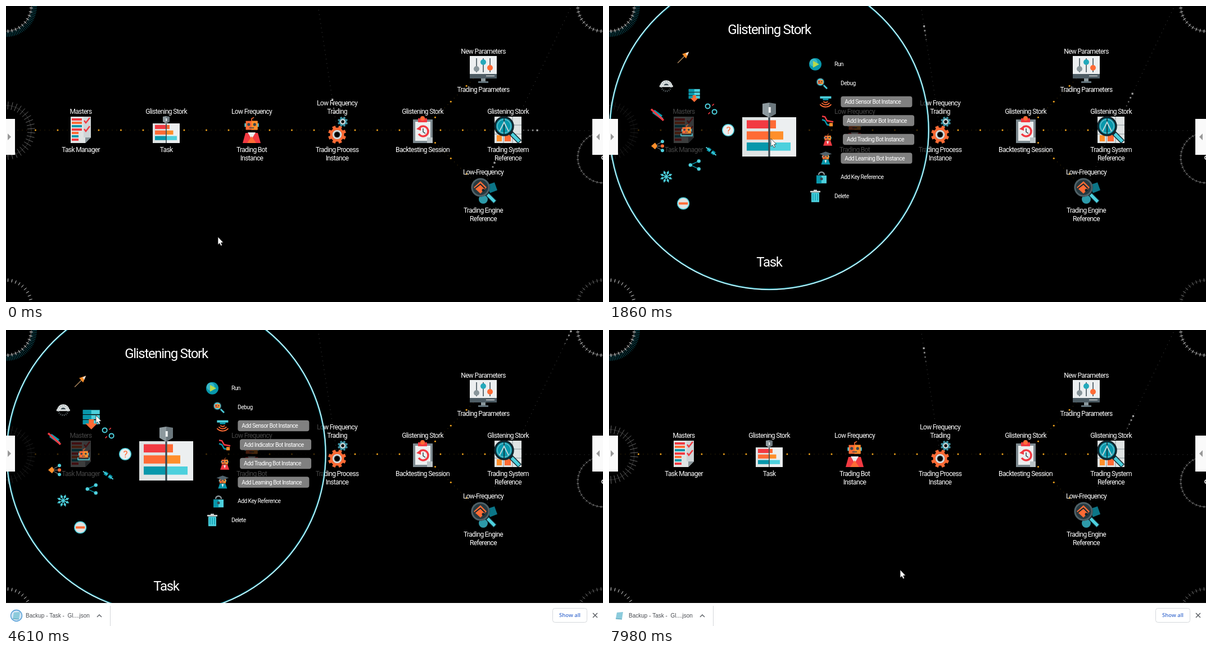
An HTML page with a canvas for the animation above (8 s loop, 1062x527 px).

```html
<!DOCTYPE html>
<html lang="en">
<head>
<meta charset="utf-8">
<title>Task backup</title>
<style>
html, body { margin: 0; width: 100%; height: 100%; overflow: hidden; background: #000 }
canvas { display: block }
</style>
</head>
<body>
<canvas id="stage" width="1062" height="527"></canvas>
<script>
const ctx = document.getElementById('stage').getContext('2d');
const LOOP = 8000, TAU = Math.PI * 2, ROW = 221, GAP = 152, FIRST = 133, OPEN = FIRST + GAP;
const RED = '#f23a42', ORANGE = '#ff6b35', AMBER = '#ff8f2b', TEAL = '#0797ab', CYAN = '#4dd0dd',
  INK = '#10262e', DARK = '#37474f', GREY = '#89969b', PAPER = '#dfe3e3', WHITE = '#eceff0';
const ramp = (t, a, b) => Math.max(0, Math.min(1, (t - a) / (b - a)));
const mix = (a, b, f) => a + (b - a) * f;

// Drawing helpers
function rect(x, y, w, h, c) { ctx.fillStyle = c; ctx.fillRect(x, y, w, h); }
function square(x, y, s, c) { rect(x - s / 2, y - s / 2, s, s, c); }
function disc(x, y, r, c, a = 0, b = TAU) { ctx.fillStyle = c; ctx.beginPath(); ctx.arc(x, y, r, a, b); ctx.fill(); }
function arc(x, y, r, c, w = 1, a = 0, b = TAU) {
  ctx.strokeStyle = c; ctx.lineWidth = w; ctx.beginPath(); ctx.arc(x, y, r, a, b); ctx.stroke();
}
function trace(p) {
  ctx.beginPath();
  for (let i = 0; i < p.length; i += 2) ctx.lineTo(p[i], p[i + 1]);
}
function line(c, w, ...p) { ctx.strokeStyle = c; ctx.lineWidth = w; trace(p); ctx.stroke(); }
function poly(c, ...p) { ctx.fillStyle = c; trace(p); ctx.closePath(); ctx.fill(); }
function rounded(x, y, w, h, r) { ctx.beginPath(); ctx.roundRect(x, y, w, h, r); }
function write(s, x, y, font, align, c, spacing = 0) {
  ctx.font = font; ctx.letterSpacing = spacing + 'px';
  ctx.textAlign = align; ctx.fillStyle = c; ctx.fillText(s, x, y);
}
function text(s, x, y, size = 12, align = 'center', c = '#fff') {
  write(s, x, y, size + 'px Roboto, sans-serif', align, c, -.055 * size);
}
function at(x, y, scale, draw) {
  ctx.save(); ctx.translate(x, y); ctx.scale(scale, scale); draw(); ctx.restore();
}
function spokes(x, y, r1, r2, n, c, w = 1) {
  for (let i = 0; i < n; i++) {
    const a = (i + .5) * TAU / n, u = Math.cos(a), v = Math.sin(a);
    line(c, w, x + u * r1, y + v * r1, x + u * r2, y + v * r2);
  }
}

// Shapes shared by several icons
function gear(x, y, r, c, hub) {
  disc(x, y, r * .78, c);
  spokes(x, y, r * .6, r, 8, c, r * .36);
  disc(x, y, r * .52, hub); disc(x, y, r * .3, '#000');
}
function lens(r, fill) {
  line(INK, r * .55, r * .7, r * .7, r * 1.75, r * 1.75);
  line(CYAN, r * .36, r * .85, r * .85, r * 1.7, r * 1.7);
  disc(0, 0, r, fill); arc(0, 0, r, INK, r * .22);
}
function robotHead() {
  rect(-12, -3, 24, 6, CYAN); rect(-10, -7, 20, 15, ORANGE); rect(0, -7, 10, 15, AMBER);
  for (const x of [-5, 5]) disc(x, -1, 2.5, DARK);
  rect(-4, 4, 8, 1.5, DARK); line(ORANGE, 1.5, 0, -7, 0, -11, 4, -13);
}
function bust(body) {
  poly(body, -8, 11, -5, 2, 5, 2, 8, 11); poly(WHITE, -2, 3, 2, 3, 0, 9);
  at(0, -3, .55, robotHead);
}
function plug(c) { at(0, 0, 1, () => { line(c, 7, -7, -5, 7, 5); line(CYAN, 2, -10, -8, 10, 8); }); }

// Large icons fill a box of 48 by 48
const art = {
  manager() {
    rect(-18, -23, 36, 47, PAPER); rect(5, -23, 13, 37, '#cfd5d7');
    for (let i = 0; i < 7; i++) rect(-16, -20 + i * 6, i < 4 ? 18 : 12, 4, [RED, ORANGE, TEAL][i % 3]);
    for (const y of [-16, -1]) line(RED, 2.5, 6, y, 9, y + 4, 16, y - 5);
    poly('#000', 18, 14, 18, 24, 8, 24); poly(GREY, 8, 24, 8, 14, 18, 14);
  },
  task() {
    rect(-24, -11, 24, 35, PAPER); rect(0, -11, 24, 35, WHITE);
    [[RED, ORANGE], [ORANGE, AMBER], [TEAL, CYAN]].forEach(([left, right], i) => {
      rect(-20, -8.3 + i * 9.9, 20, 7.3, left); rect(0, -8.3 + i * 9.9, 6 + i * 6.5, 7.3, right);
    });
    rect(-.8, -13, 1.6, 37, DARK);
    poly('#8d999e', 0, -24, -6, -23, -6, -14, 0, -10.5);
    poly('#6b777d', 0, -24, 6, -23, 6, -14, 0, -10.5);
    rect(-.6, -20, 2, 5, WHITE);
  },
  robot() {
    poly(RED, -16, 24, -11, 6, 11, 6, 16, 24); poly(WHITE, -7, 5, 7, 5, 0, 17);
    poly(ORANGE, -8, 24, 0, 12, 8, 24);
    at(0, -8, 1.05, robotHead);
  },
  gears() { gear(10, -14, 9, '#3f93a3', PAPER); gear(0, 9, 16, ORANGE, GREY); arc(0, 9, 7, PAPER, 2); },
  clipboard() {
    rect(-17, -18, 35, 42, '#7c898f'); rect(-13, -14, 27, 34, WHITE);
    poly('#b9c2c5', 18, 14, 18, 24, 8, 24, 8, 14);
    rect(-8, -20, 16, 7, RED); disc(0, -20, 4, ORANGE);
    arc(1, 3, 9, RED, 3.5, -2.2, 2.6); poly(RED, -11, -1, -3, -7, -3, 2);
    line(DARK, 1.5, 1, -2, 1, 4, 5, 7);
  },
  system() {
    rect(-24, -23, 48, 47, PAPER);
    for (const v of [-8, 8]) { line(GREY, 1, v, -23, v, 24); line(GREY, 1, -24, v, 24, v); }
    rect(-20, 10, 9, 11, AMBER); rect(-6, 10, 11, 11, ORANGE);
    at(-7, -6, 1, () => {
      lens(16, TEAL); arc(0, 0, 12, '#67bdca', 1.5);
      line(INK, 1.5, 0, -14, 0, 14); line('#b8d3d8', 2, -8, 9, 0, -7, 8, 9);
    });
  },
  monitor() {
    rect(-24, -24, 48, 32, WHITE); rect(-24, 8, 48, 8, '#4e5d65'); rect(5, 11, 15, 1, '#fff');
    rect(-4, 16, 8, 6, GREY); rect(-9, 21, 18, 3, '#62727a');
    [GREY, '#24a9bb', ORANGE].forEach((c, i) => {
      const x = (i - 1) * 12;
      rect(x - .7, -20, 1.5, 25, DARK); disc(x, [-1, -13, -3][i], 5, c);
    });
  },
  engine() {
    poly('#0b7587', 5, -9, 20, -14, 25, 0, 12, 5); disc(0, 16, 8, '#2d9aa9');
    at(-5, -5, 1, () => {
      lens(15, '#263940'); arc(0, 0, 15, '#506066', 3);
      poly(ORANGE, -12, 0, 0, -11, 11, 0, 0, 11); line(INK, 2, -10, 2, 0, -6, 8, 2); disc(5, 5, 2.5, INK);
    });
  }
};

const row = (i, icon, name, type) => ({ x: FIRST + i * GAP, y: 220, icon, name, type });
const nodes = [
  row(0, 'manager', ['Masters'], ['Task Manager']),
  row(2, 'robot', ['Low Frequency'], ['Trading Bot', 'Instance']),
  row(3, 'gears', ['Low Frequency', 'Trading'], ['Trading Process', 'Instance']),
  row(4, 'clipboard', ['Glistening Stork'], ['Backtesting Session']),
  row(5, 'system', ['Glistening Stork'], ['Trading System', 'Reference']),
  { x: 849, y: 113, icon: 'monitor', name: ['New Parameters'], type: ['Trading Parameters'] },
  { x: 849, y: 328, icon: 'engine', name: ['Low-Frequency'], type: ['Trading Engine', 'Reference'] }
];

// Small icons
const small = {
  match() { line('#a8845c', 1.5, -10, 11, 5, -4); poly(AMBER, -2, -5, 10, -9, 5, 3); poly(PAPER, 4, -6, 10, -9, 7, -2); },
  protractor() { disc(0, 5, 11, PAPER, Math.PI, 0); disc(0, 5, 5, DARK, Math.PI, 0); spokes(0, 5, 7, 10, 16, GREY); rect(-12, 3, 24, 3, PAPER); },
  unplug() { plug(TEAL); line(RED, 3.5, -11, -9, 11, 11); },
  network() {
    for (const y of [-8, 0, 8]) { line(GREY, 1, -5, 0, 9, y); disc(9, y, 3, y ? CYAN : ORANGE); }
    poly(AMBER, -11, 0, -4, -6, 0, 0, -4, 6);
  },
  snowflake() { spokes(0, 0, 0, 11, 8, CYAN, 1.7); spokes(0, 0, 6, 9, 8, CYAN, 4); },
  minus() { disc(0, 0, 11, CYAN); disc(0, 0, 9.5, PAPER); rect(-8, -2, 16, 4, ORANGE); },
  backup() {
    for (let i = 0; i < 3; i++) { rect(-10, i * 6 - 11, 20, 5, CYAN); rect(-10, i * 6 - 11, 10, 5, TEAL); }
    poly(ORANGE, -3, 0, 3, 0, 3, 5, 7, 5, 0, 12, -7, 5, -3, 5);
  },
  bot() { at(0, 0, .75, robotHead); line(CYAN, 1.5, -10, 6, -10, 10, 10, 10, 10, 6); },
  share() {
    line(TEAL, 1.5, 8, -7, -7, 0, 8, 7);
    for (const y of [-7, 0, 7]) disc(y ? 8 : -7, y, 3.2, CYAN);
  },
  chain() { for (const s of [-1, 1]) { arc(6 * s, 5 * s, 4, CYAN, 2); line(RED, 1.5, 2 * s, -6 * s, 5 * s, -9 * s); } },
  plugs() { at(0, 0, .9, () => plug(TEAL)); line('#000', 3, -4, 5, 4, -5); },
  help() { disc(0, 0, 11, CYAN); disc(0, 0, 9.5, WHITE); text('?', 0, 1, 17, 'center', ORANGE); },
  run() { disc(0, 0, 11, TEAL); disc(-3, -3, 7, '#37b6c6'); poly('#b6d94c', -4, -6, 7, 0, -4, 6); },
  debug() { at(-2, -2, 1, () => { lens(7, CYAN); at(0, 0, .45, robotHead); }); },
  sensor() {
    rect(-10, -10, 20, 4, CYAN); rect(-5, -6, 10, 3, TEAL);
    for (let r = 5; r < 15; r += 4) arc(0, -4, r, ORANGE, 1.8, .7, 2.45);
  },
  indicator() { line(RED, 2.5, -10, -8, -5, -7, -1, 0, 10, 2); line(TEAL, 2.5, -10, -2, -5, 0, -1, 7, 5, 8); square(6, 7, 6, AMBER); },
  trading() { bust(RED); },
  learning() { bust(TEAL); poly('#51646e', -11, -8, 0, -12, 11, -8, 0, -4); },
  key() { arc(0, -4, 5, GREY, 2.5, Math.PI, 0); rect(-9, -3, 18, 14, CYAN); rect(-9, -3, 9, 14, TEAL); disc(0, 3, 2.5, DARK); },
  trash() {
    rect(-7, -6, 14, 17, CYAN); rect(-9, -9, 18, 2.5, PAPER); rect(-3, -11, 6, 2, PAPER);
    for (const x of [-4, 0, 4]) rect(x - .7, -4, 1.4, 12, TEAL);
  }
};
// Fans of tools, each spread evenly about the left of the open node: radius, step in degrees, icons
const fans = [
  [201, 16.2, ['match', 'protractor', 'unplug', 'network', 'snowflake', 'minus']],
  [147, 25, ['backup', 'bot', 'share']],
  [110, 40, ['chain', 'plugs']],
  [73, 0, ['help']]
];
const menu = {
  run: 'Run', debug: 'Debug', sensor: 'Add Sensor Bot Instance', indicator: 'Add Indicator Bot Instance',
  trading: 'Add Trading Bot Instance', learning: 'Add Learning Bot Instance', key: 'Add Key Reference', trash: 'Delete'
};

function dots(x0, y0, x1, y1, c) {
  const n = Math.hypot(x1 - x0, y1 - y0) / 8;
  for (let i = 0; i < n; i++) square(mix(x0, x1, i / n), mix(y0, y1, i / n), 1.2, c);
}
function link(x0, y0, x1, y1) {
  dots(x0, y0, x1, y1, '#3f2e0a');
  for (const f of [.21, .47, .73]) disc(mix(x0, x1, f), mix(y0, y1, f), 1.5, '#f0a31c');
}
// A short train of grey dots that runs along a faint line
function signal(t, x0, y0, x1, y1, start, speed = .071) {
  dots(x0, y0, x1, y1, '#343434');
  const length = Math.hypot(x1 - x0, y1 - y0), run = (t - start + 6070) % 6070 * speed;
  for (let i = 0; i < 4; i++) {
    const f = (run - i * 8) / length, shade = 165 - i * 28;
    if (f > 0 && f < 1) square(mix(x0, x1, f), mix(y0, y1, f), 3.2 - i * .4, `rgb(${shade},${shade},${shade})`);
  }
}

function dial(x, y, c, tick, half = 3) {
  arc(x, y, 45, c); spokes(x, y, 45 - half, 45 + half, 40, tick);
}
function dials(low) {
  spokes(0, 0, 46, 55, 110, '#0b5a66');
  dial(0, 0, '#888', '#eee'); dial(1062, 0, '#777', '#ddd');
  dial(0, 222, '#333', '#666', 7); dial(1062, 270, '#666', '#888', 2);
  dial(0, low, '#111', '#ddd'); dial(1062, low, '#222', '#777');
  arc(1063, 270, 3, '#fff', 1.5);
}

function drawTools(t, q) {
  for (const [radius, step, icons] of fans) icons.forEach((icon, i) => {
    if (icon == 'help' && t < 1500) return;
    const a = Math.PI + ((icons.length - 1) / 2 - i) * -step * TAU / 360 * -1;
    const hover = icon == 'backup' ? 1 + .5 * ramp(t, 3700, 3950) : 1;
    at(OPEN + radius * q * Math.cos(a), ROW + radius * q * Math.sin(a), q * hover, small[icon]);
  });
}
function drawMenu() {
  Object.entries(menu).forEach(([icon, label], i) => {
    const dy = (i - 3.5) * 33.5, x = 389.5 - dy * dy * .00164, y = ROW + dy;
    at(x, y, 1, small[icon]);
    if (label.endsWith('Instance')) { rounded(x + 27, y - 10, 127, 19.5, 4); ctx.fillStyle = '#808080'; ctx.fill(); }
    text(label, x + 34, y + .5, 10.3, 'left');
  });
}
function openNode(t) {
  const p = ramp(t, 756, 1491) - ramp(t, 4720, 5454), q = Math.min(1, p * 1.08), spread = q ** 2.3;
  ctx.globalAlpha = ramp(p, .3, .5);
  if (p > .3) {
    disc(OPEN, ROW, 284 * q, 'rgba(0,0,0,.73)');
    arc(OPEN, ROW, 283.5 * q, TEAL, 3); arc(OPEN, ROW, 283.8 * q, '#fff', 1.3);
    drawTools(t, q);
  }
  ctx.globalAlpha = ramp(t, 1500, 1750) - ramp(t, 4700, 4800);
  if (ctx.globalAlpha) drawMenu();
  ctx.globalAlpha = 1;
  at(OPEN, 220, 1 + p, art.task);
  text('Glistening Stork', OPEN, 188.5 - 146 * spread, 12 * (1 + p));
  text('Task', OPEN, 256.5 + 200 * spread, 12 * (1 + p));
}

function downloadBar(t) {
  rect(0, 486, 1062, 41, '#fff');
  ctx.globalAlpha = 1 - ramp(t, 6650, 7100);
  disc(18.5, 508.5, 10, '#d3e6f5'); arc(18.5, 508.5, 10, '#4c9ad4', 1.3);
  ctx.globalAlpha = 1;
  poly('#8ccbdc', 14, 503, 25, 502, 23, 515, 12, 514); line('#4d9db5', 1, 12, 514, 23, 515);
  write('Backup - Task -  Gl....json', 35, 509, '10px "Liberation Sans", sans-serif', 'left', '#4a4d52');
  line('#5f6368', 1.5, 162, 511, 166, 507, 170, 511);
  rect(185, 491, 1, 36, '#d5d7da');
  rounded(972.5, 495.5, 61, 25, 4); ctx.strokeStyle = '#d5d8dc'; ctx.lineWidth = 1; ctx.stroke();
  write('Show all', 1003, 508.5, '600 9.5px "Open Sans", sans-serif', 'center', '#3f6fd0');
  for (const s of [-4, 4]) line('#5f6368', 1.6, 1048 - s, 504, 1048 + s, 512);
}
function tabs(y) {
  for (const [x, w, tip] of [[0, 16, 9], [1043, 19, 1050]]) {
    const back = tip + (x ? 6 : -6);
    rect(x, y, w, 64, '#fafafa'); poly('#999', back, y + 26, tip, y + 32, back, y + 38);
  }
}

// Pointer moves: start time, end time, and the place reached
const moves = [[120, 760, 288, 236], [3280, 3800, 160, 152], [4640, 5270, 594, 400], [5270, 5600, 621, 411], [7000, 7900, 518, 427]];
function pointer(t) {
  let x = 377, y = 411;
  for (const [start, end, toX, toY] of moves) {
    const u = ramp(t, start, end), ease = u * u * (3 - 2 * u);
    x = mix(x, toX, ease); y = mix(y, toY, ease);
  }
  at(x, y, 1, () => {
    poly('#fff', 0, 0, 0, 14, 3, 11.5, 5.2, 16, 7.5, 15, 5.5, 10.5, 9.5, 10);
    ctx.closePath(); ctx.strokeStyle = '#111'; ctx.lineWidth = .7; ctx.stroke();
  });
}

function draw(now) {
  const t = now % LOOP, bar = t >= 4200;
  rect(0, 0, 1062, 527, '#000');
  ctx.textBaseline = 'middle';
  dials(bar ? 506 : 533);
  for (let i = -1; i < 5; i++) link(FIRST + i * GAP, ROW, FIRST + (i + 1) * GAP, ROW);
  for (const y of [113, 328]) link(741, ROW, 848, y);
  signal(t, 589, ROW, 555, 0, -775);
  signal(t, 893, ROW, 1062, 222, -732);
  signal(t, 900, ROW, 1006, 0, 700, .062);
  signal(t, 848, 330, 893, ROW, -775);
  for (const { x, y, icon, name, type } of nodes) {
    at(x, y, 1, art[icon]);
    name.forEach((s, i) => text(s, x, y - 31.5 - 15 * (name.length - 1 - i)));
    type.forEach((s, i) => text(s, x, y + 36.5 + 15 * i));
  }
  openNode(t);
  tabs(bar ? 188 : 201);
  if (bar) downloadBar(t);
  pointer(t);
  requestAnimationFrame(draw);
}
requestAnimationFrame(draw);
</script>
</body>
</html>
```
